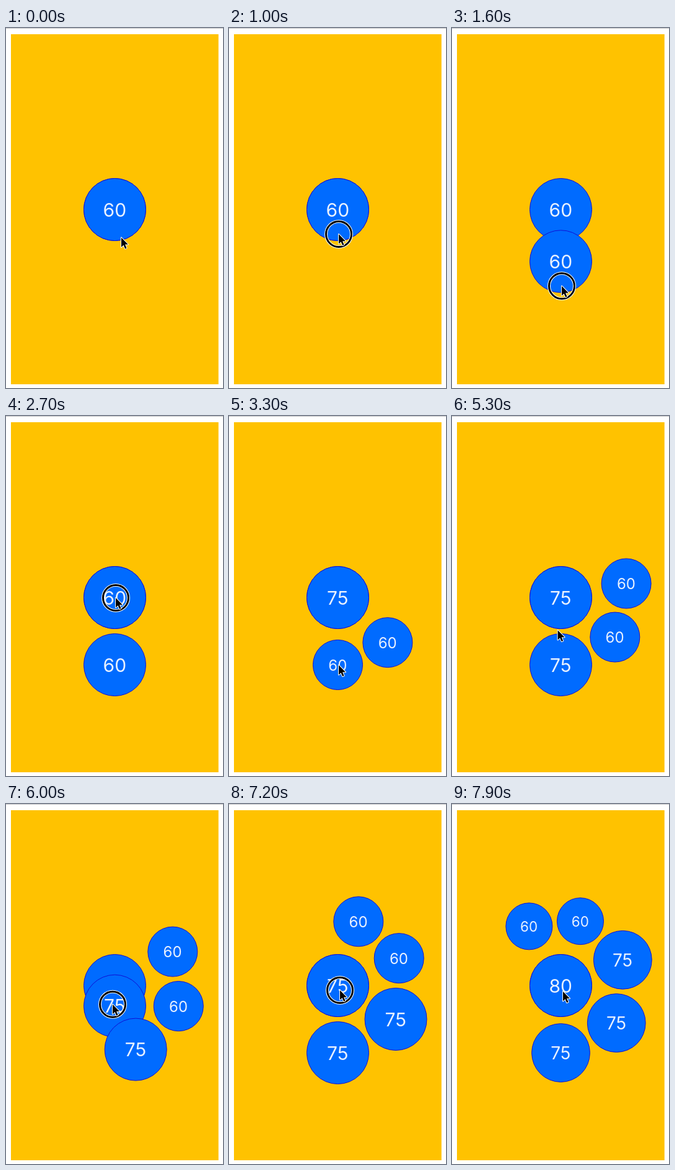
An HTML page with a canvas that plays this animation: 350 px wide and 578 px high, repeating every 8000 ms.

```html
<!DOCTYPE html>
<html>
<head>
<meta charset="utf-8">
<style>
html, body { margin: 0; width: 100%; height: 100%; overflow: hidden; background: #fff; }
canvas { display: block; width: 350px; height: 578px; }
</style>
</head>
<body>
<canvas id="stage"></canvas>
<script>
const canvas = document.getElementById('stage');
const ctx = canvas.getContext('2d');
const dpr = window.devicePixelRatio || 1;
canvas.width = 350 * dpr;
canvas.height = 578 * dpr;

const LOOP = 8000, STEP = 100, GLIDE = 500;
const CX = 175.5, CY = 291.5, RADIUS = 50, ORBIT = 108, GAP = 8;
const values = [60, 60, 75, 75, 75, 80, 80];

// Each drag pulls the centre ball down into orbit; reach is how far the pointer follows.
const drags = [
  { start: 1000, end: 1870, x: 177, y: 331, reach: ORBIT },
  { start: 2700, end: 3200, x: 177, y: 292, reach: ORBIT },
  { start: 4200, end: 5225, x: 169, y: 298, reach: ORBIT },
  { start: 5640, end: 6625, x: 172, y: 289, reach: ORBIT },
  { start: 7200, end: 7850, x: 179, y: 299, reach: 2 }
];

const mix = (a, b, p) => a + (b - a) * p;
const ease = (a, b, t) => {
  const p = Math.min(1, Math.max(0, (t - a) / (b - a)));
  return p * p * (3 - 2 * p);
};
const pull = (drag, t) => ease(drag.start, drag.end, t);

// Packs placed balls around the orbit, newest at the bottom.
function layout(count) {
  const spots = [];
  let angle = Math.PI / 2;
  for (let i = count - 1; i >= 0; i--) {
    const r = RADIUS * values[i] / values[count];
    if (i < count - 1) angle -= 2 * Math.asin((r + spots[i + 1].r + GAP) / (2 * ORBIT));
    spots[i] = { angle, r };
  }
  return spots;
}

function pointerAt(t) {
  if (t < drags[0].start) {
    // One lap around the ball before the first press.
    const a = mix(.16, 6.15, t / drags[0].start);
    return { x: 181 + 31 * Math.sin(a), y: 290 + 47 * Math.cos(a) };
  }
  const i = drags.findLastIndex(d => t >= d.start);
  const drag = drags[i], next = drags[i + 1] || drag;
  const moved = pull(drag, t);
  const glide = ease(next.start - 100 - GLIDE, next.start - 100, t) * (next !== drag);
  return {
    x: mix(drag.x, next.x, glide),
    y: mix(drag.y + drag.reach * moved, next.y, glide)
  };
}

const isPressed = t => drags.some(d =>
  t >= d.start - 100 * (d !== drags[0]) && ORBIT * pull(d, t) < d.reach * .9);

function ball(x, y, r, value) {
  ctx.beginPath();
  ctx.arc(x, y, r, 0, 2 * Math.PI);
  ctx.fillStyle = '#006bff';
  ctx.fill();
  ctx.lineWidth = 1;
  ctx.strokeStyle = '#1010d4';
  ctx.stroke();
  ctx.fillStyle = '#e8f1ff';
  ctx.font = `${r * .6}px Inter, Roboto, sans-serif`;
  ctx.textAlign = 'center';
  ctx.fillText(value, x - .2, y + r * .225);
}

function ring(x, y) {
  ctx.beginPath();
  ctx.arc(x, y, 20.5, 0, 2 * Math.PI);
  for (const [width, color] of [[5, '#fff'], [3, '#000']]) {
    ctx.lineWidth = width;
    ctx.strokeStyle = color;
    ctx.stroke();
  }
}

const arrow = new Path2D('M0 0V15.5L3.6 12.2L6.2 18L8.6 17L6.1 11.2H11Z');
function cursor(x, y) {
  ctx.save();
  ctx.translate(x, y);
  ctx.lineWidth = 2;
  ctx.lineJoin = 'round';
  ctx.strokeStyle = '#fff';
  ctx.stroke(arrow);
  ctx.fillStyle = '#000';
  ctx.fill(arrow);
  ctx.restore();
}

function rect(color, x, y, w, h) {
  ctx.fillStyle = color;
  ctx.fillRect(x, y, w, h);
}

function draw(t) {
  ctx.setTransform(dpr, 0, 0, dpr, 0, 0);
  rect('#fff', 0, 0, 350, 578);
  rect('#c6c6c8', 0, 0, 350, 1);
  rect('#ffc200', 8, 10, 334.7, 562);

  const placed = drags.filter(d => t >= d.end).length;
  const p = placed < drags.length ? pull(drags[placed], t) : 0;
  const from = layout(placed);
  const to = p ? layout(placed + 1) : from;

  // The next ball waits beneath the one being pulled.
  ball(CX, CY, RADIUS, values[placed + 1]);
  ball(CX, CY + ORBIT * p, p ? mix(RADIUS, to[placed].r, p) : RADIUS, values[placed]);
  for (let i = placed - 1; i >= 0; i--) {
    const angle = mix(from[i].angle, to[i].angle, p);
    ball(CX + ORBIT * Math.cos(angle), CY + ORBIT * Math.sin(angle),
      mix(from[i].r, to[i].r, p), values[i]);
  }

  const { x, y } = pointerAt(t);
  if (isPressed(t)) ring(x, y);
  cursor(x, y);
}

const start = performance.now();
function tick() {
  const t = (performance.now() - start) % LOOP;
  draw(Math.floor(t / STEP) * STEP);
  requestAnimationFrame(tick);
}
tick();
</script>
</body>
</html>
```
